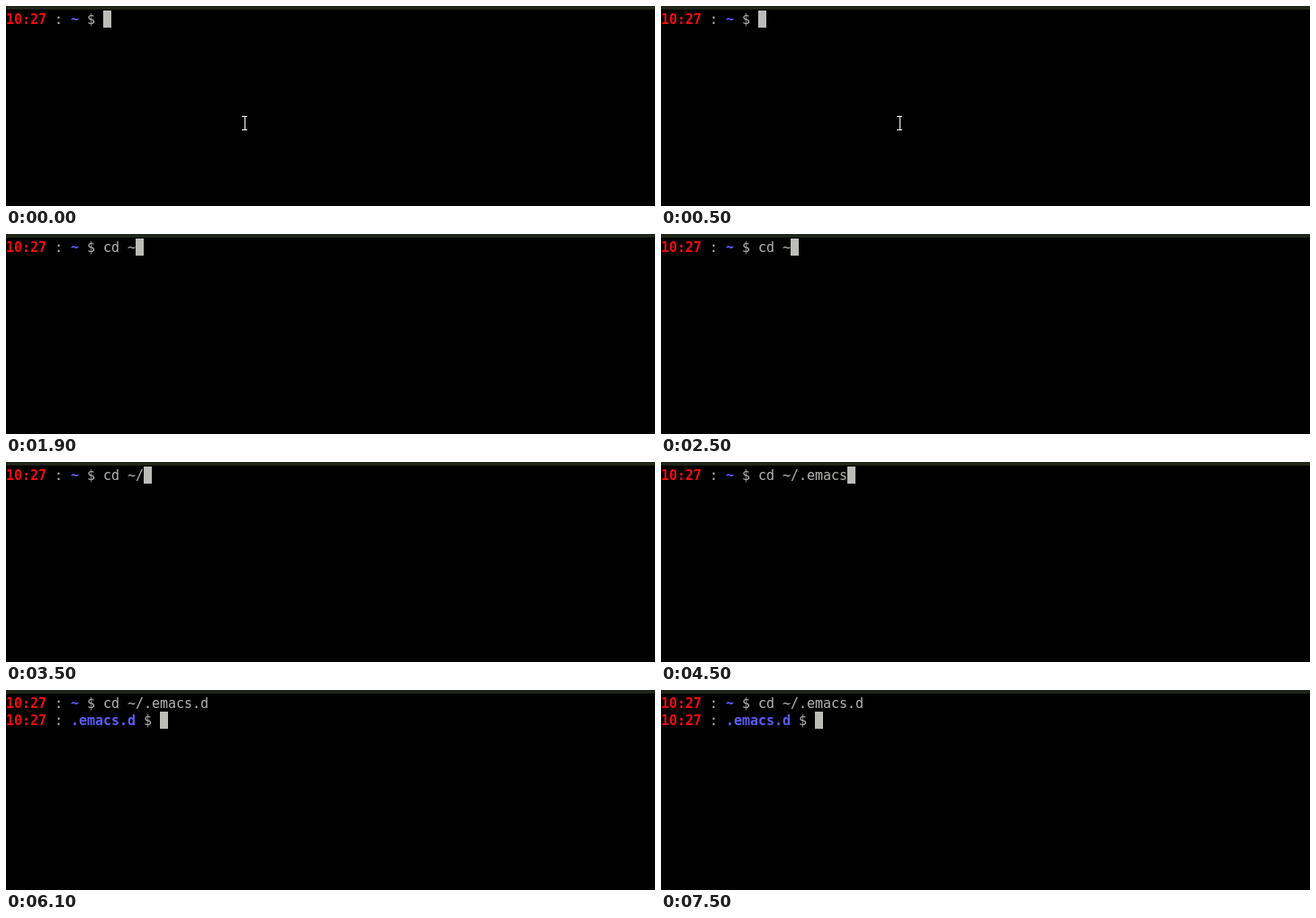
These frames come from a looping animation (721x222 px, 8 s). An HTML page with a canvas:

```html
<!DOCTYPE html>
<html lang="en">
<head>
<meta charset="utf-8">
<title>Terminal</title>
<style>
  html, body { margin: 0; width: 721px; height: 222px; overflow: hidden; background: #000; }
  canvas { display: block; }
</style>
</head>
<body>
<canvas id="stage" width="721" height="222"></canvas>
<script>
const ctx = document.getElementById('stage').getContext('2d');
const LOOP = 8000;
const CELL = 9, ROW = 19, TOP = 5, BASE = 20;
const RED = '#f80a0a', BLUE = '#5c5cf8', GREY = '#b4b4b0', CURSOR = '#bcbcb8';
const POINTER_HIDES = 900, ENTER = 6000;
const COMMAND = 'cd ~/.emacs.d';

// [time in ms, characters of the command visible from then on]
const TYPING = [
  [900, 1], [1000, 2], [1300, 3], [1900, 4], [3100, 5],
  [3700, 6], [4000, 7], [4100, 8], [4400, 11], [4800, 12], [5000, 13]
];

function write(text, col, row, color, bold) {
  ctx.font = (bold ? 'bold ' : '') + '15px "DejaVu Sans Mono", monospace';
  ctx.fillStyle = color;
  [...text].forEach((ch, i) => ctx.fillText(ch, (col + i) * CELL, BASE + row * ROW));
  return col + text.length;
}

function prompt(dir, row) {
  let col = write('10:27', 0, row, RED, true);
  col = write(' : ', col, row, GREY);
  col = write(dir, col, row, BLUE, true);
  return write(' $ ', col, row, GREY);
}

function cursor(col, row) {
  ctx.fillStyle = CURSOR;
  ctx.fillRect(col * CELL, TOP + row * ROW, CELL, ROW);
}

function pointer(x, y) {
  ctx.fillStyle = '#fff';
  ctx.fillRect(x - 3, y, 6, 1);
  ctx.fillRect(x - 3, y + 15, 6, 1);
  ctx.fillRect(x, y, 1, 16);
}

function draw(t) {
  ctx.fillStyle = '#000';
  ctx.fillRect(0, 0, 721, 222);
  ctx.fillStyle = '#21261a';
  ctx.fillRect(0, 0, 721, 4);

  let typed = 0;
  for (const [time, count] of TYPING) if (t >= time) typed = count;

  const end = write(COMMAND.slice(0, typed), prompt('~', 0), 0, GREY);
  if (t < ENTER) cursor(end, 0);
  else cursor(prompt('.emacs.d', 1), 1);

  if (t < POINTER_HIDES) pointer(265, 122);
}

const start = performance.now();
function tick() {
  draw((performance.now() - start) % LOOP);
  requestAnimationFrame(tick);
}
tick();
</script>
</body>
</html>
```
